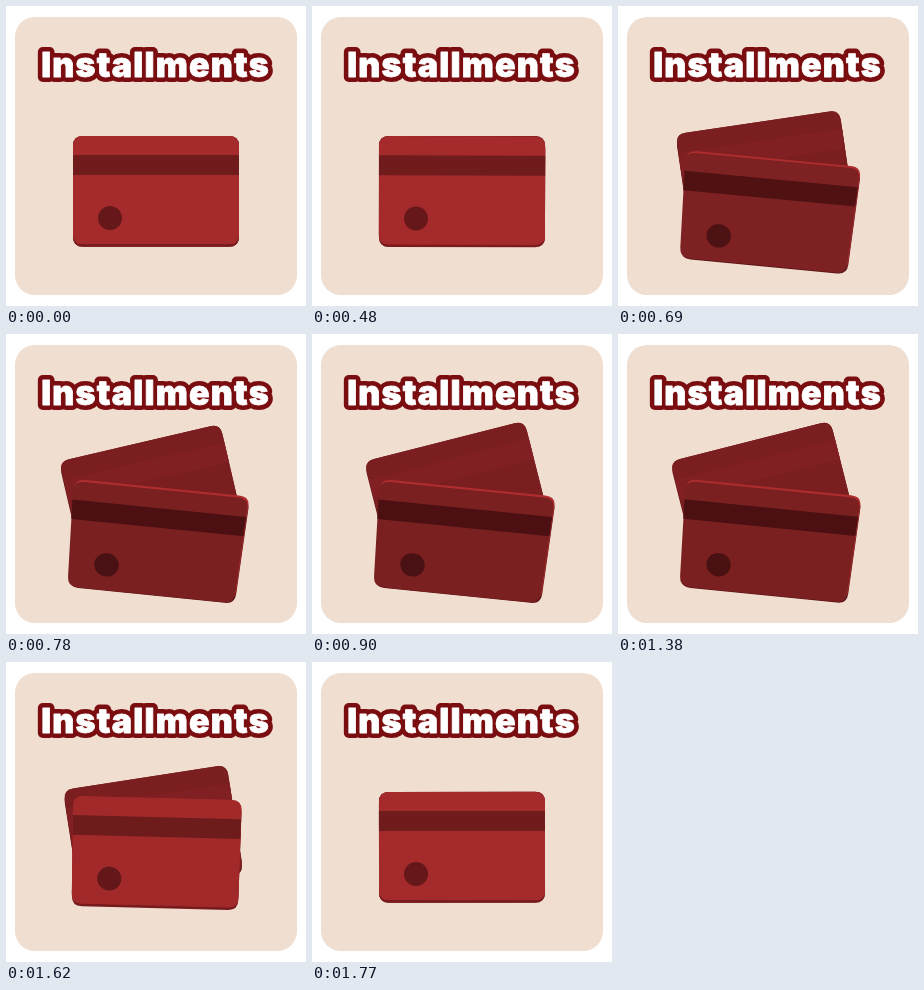
Animation, 300 px wide and 300 px high, one loop 1.8 s. Source, as an HTML page:

```html
<!DOCTYPE html>
<html lang="en">
<head>
<meta charset="utf-8">
<title>Installments</title>
<style>
  html, body { margin: 0; width: 100%; height: 100%; overflow: hidden; background: #fff; }
  svg { display: block; width: 100vw; height: 100vh; }
  text {
    font: 900 34px Inter, "Open Sans", sans-serif;
    letter-spacing: 1.2px;
    text-anchor: middle;
    stroke-linejoin: round;
  }
</style>
</head>
<body>
<svg viewBox="0 0 300 300">
  <rect x="9" y="11" width="282" height="278" rx="20" fill="#f0ded0"/>
  <g id="cards"></g>
  <text x="149.5" y="71" fill="#7a0d10" stroke="#7a0d10" stroke-width="10">Installments</text>
  <text x="149.5" y="71" fill="#fff" stroke="#fff" stroke-width=".8">Installments</text>
</svg>
<script>
const LOOP = 1800, STEP = 30;
const layer = document.getElementById('cards');
const rest = { x: 150, y: 184, w: 166, h: 108, turn: 0, taper: 0 };

// Each card swings from rest to its fanned pose and back; colours go from lit to shaded.
const back = {
  fanned: { x: 145.6, y: 159.5, w: 165, h: 108, turn: -14.2, taper: 0 },
  opens: [450, 900], closes: [1470, 1800], power: 3, rim: 0,
  ink: {
    edge: ['#641719', '#641719'], rim: ['#7a1e20', '#7a1e20'], face: ['#7a1e20', '#7a1e20'],
    stripe: ['#812022', '#812022'], badge: ['#561214', '#561214']
  }
};
const front = {
  fanned: { x: 150.9, y: 206.3, w: 171.6, h: 105.5, turn: 5.75, taper: .052 },
  opens: [450, 735], closes: [1350, 1770], power: 2, rim: 1,
  ink: {
    edge: ['#7a1b1d', '#5a1416'], rim: ['#a52a2b', '#b02d2f'], face: ['#a52a2b', '#7a2021'],
    stripe: ['#701c1d', '#4c1012'], badge: ['#651719', '#491113']
  }
};

const lerp = (a, b, p) => a + (b - a) * p;

function mix([a, b], p) {
  const part = (hex, i) => parseInt(hex.slice(i, i + 2), 16);
  return `rgb(${[1, 3, 5].map(i => Math.round(lerp(part(a, i), part(b, i), p)))})`;
}

function ease(t, [from, to], power) {
  const p = Math.min(1, Math.max(0, (t - from) / (to - from)));
  return p < .5 ? (2 * p) ** power / 2 : 1 - (2 - 2 * p) ** power / 2;
}

// Maps card coordinates (0..1) onto the stage.
function mapper(pose) {
  const a = pose.turn * Math.PI / 180, cos = Math.cos(a), sin = Math.sin(a);
  return (u, v) => {
    const x = (u - .5) * pose.w * (1 + pose.taper * (.5 - v));
    const y = (v - .5) * pose.h;
    return [pose.x + x * cos - y * sin, pose.y + x * sin + y * cos]
      .map(n => n.toFixed(2)).join(' ');
  };
}

function outline(at) {
  const u = 10 / rest.w, v = 10 / rest.h;
  return `M${at(u, 0)}L${at(1 - u, 0)}Q${at(1, 0)} ${at(1, v)}` +
    `L${at(1, 1 - v)}Q${at(1, 1)} ${at(1 - u, 1)}` +
    `L${at(u, 1)}Q${at(0, 1)} ${at(0, 1 - v)}L${at(0, v)}Q${at(0, 0)} ${at(u, 0)}Z`;
}

const band = at => `M${at(0, .176)}L${at(1, .176)}L${at(1, .361)}L${at(0, .361)}Z`;

function disc(at) {
  const points = Array.from({ length: 32 }, (_, i) => {
    const a = i * Math.PI / 16;
    return at(.223 + 12 / rest.w * Math.cos(a), .76 + 12 / rest.h * Math.sin(a));
  });
  return `M${points.join('L')}Z`;
}

const shapes = { edge: outline, rim: outline, face: outline, stripe: band, badge: disc };

function makeCard({ fanned, opens, closes, power, rim, ink }) {
  const parts = Object.keys(shapes).map(name => {
    const path = document.createElementNS('http://www.w3.org/2000/svg', 'path');
    layer.append(path);
    return [name, path];
  });
  return t => {
    const p = ease(t, opens, power) - ease(t, closes, power), shade = p * p;
    const pose = {};
    for (const key in rest) pose[key] = lerp(rest[key], fanned[key], p);
    const at = mapper(pose), lift = rim * shade;
    const shifts = { edge: [0, 2.7], rim: [0, 0] };
    for (const [name, path] of parts) {
      path.setAttribute('d', shapes[name](at));
      path.setAttribute('fill', mix(ink[name], shade));
      path.setAttribute('transform', `translate(${shifts[name] || [-lift, 2 * lift]})`);
    }
  };
}

const cards = [back, front].map(makeCard);
const start = performance.now();

function tick() {
  const t = Math.floor((performance.now() - start) % LOOP / STEP) * STEP;
  cards.forEach(draw => draw(t));
  requestAnimationFrame(tick);
}
tick();
</script>
</body>
</html>
```
